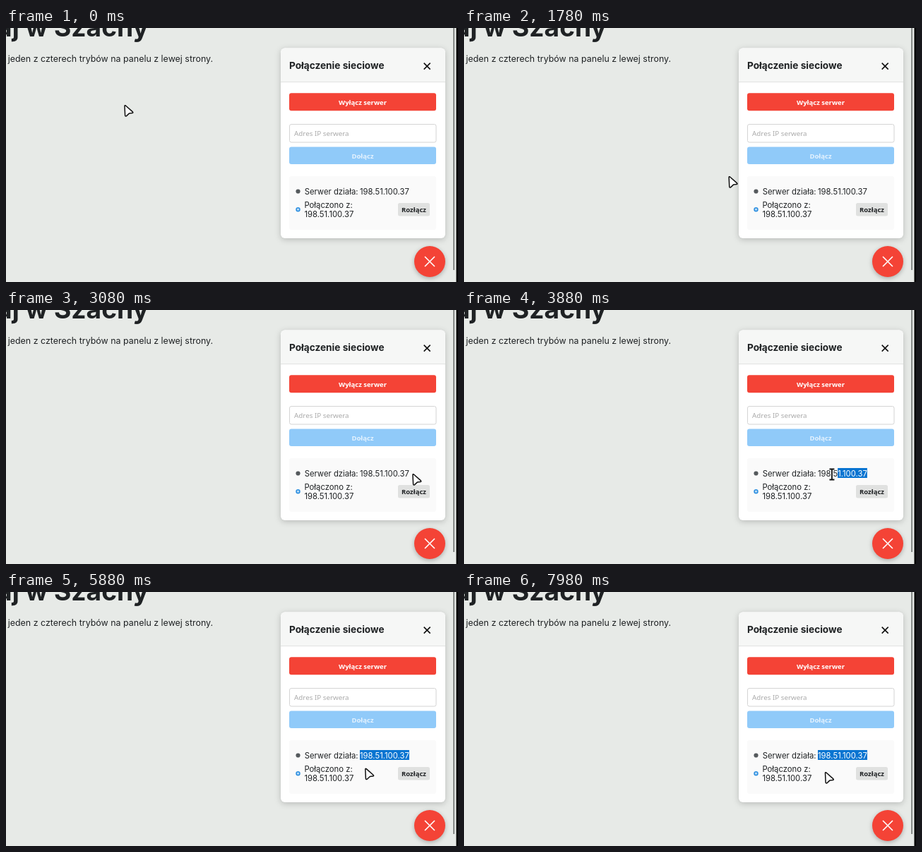
These frames come from a looping animation (640 by 360 pixels, 8000 ms). An HTML page:

```html
<!DOCTYPE html>
<html lang="pl">
<head>
<meta charset="utf-8">
<title>Połączenie sieciowe</title>
<style>
  html, body { margin: 0; width: 100%; height: 100%; overflow: hidden; background: #e7eae7; }
  svg { display: block; width: 640px; height: 360px; }
  text { font-family: Inter, sans-serif; fill: #1f2224; }
  .heading { font-size: 37.2px; font-weight: 700; text-anchor: end; }
  .lead { font-size: 12.45px; }
  .title { font-size: 13.65px; font-weight: 700; }
  .status { font-size: 11.3px; }
  .control { font: 600 9.5px "Noto Sans", sans-serif; text-anchor: middle; }
  .hint { font: 9.8px "Noto Sans", sans-serif; fill: #aaa; }
  .light { fill: #fff; }
  .panel { filter: drop-shadow(0 2px 4px #0003); }
  .fab { filter: drop-shadow(0 2px 3px #0004); }
</style>
</head>
<body>
<svg viewBox="0 0 640 360">
  <defs>
    <clipPath id="selectionClip"><rect id="selection" y="224" width="0" height="14"/></clipPath>
  </defs>
  <rect width="640" height="360" fill="#e7eae7"/>
  <text class="heading" x="202" y="11.7">Zagraj w Szachy</text>
  <text class="lead" x="2.7" y="48.1">jeden z czterech trybów na panelu z lewej strony.</text>
  <rect x="633.3" width="1.7" height="343" fill="#747876"/>
  <rect x="637.5" width="2.5" height="360" fill="#050505"/>

  <g class="panel">
    <rect x="389" y="28.5" width="233" height="269.5" rx="6" fill="#fff"/>
    <path d="M389 76.5V34.5a6 6 0 0 1 6-6H616a6 6 0 0 1 6 6V76.5Z" fill="#f6f7f6"/>
    <path d="M389 76.5H622" stroke="#e1e3e1"/>
  </g>
  <text class="title" x="401" y="57.7">Połączenie sieciowe</text>
  <path d="M591.7 49.6l9 9m0-9l-9 9" stroke="#111" stroke-width="1.6"/>

  <rect x="401" y="92.3" width="208" height="25" rx="3" fill="#f44336"/>
  <text class="control light" x="505" y="108.8">Wyłącz serwer</text>
  <rect x="401.5" y="136.5" width="207.5" height="25.5" rx="2.5" fill="#fff" stroke="#d4d4d4"/>
  <text class="hint" x="408" y="153">Adres IP serwera</text>
  <rect x="401" y="168.5" width="208" height="24.5" rx="3" fill="#90caf9"/>
  <text class="control" x="505" y="184.7" style="fill:#e4f2fe">Dołącz</text>

  <rect x="401" y="210" width="208" height="76" rx="3" fill="#fafafa"/>
  <circle cx="413.5" cy="231.5" r="3.1" fill="#555a5d"/>
  <text class="status" x="422.7" y="235.6">Serwer działa:</text>
  <text class="status" id="address" x="501" y="235.6">198.51.100.37</text>
  <g clip-path="url(#selectionClip)">
    <rect x="490" y="224" width="100" height="14" fill="#0874d1"/>
    <text class="status light" x="501" y="235.6">198.51.100.37</text>
  </g>
  <circle cx="413.5" cy="257.2" r="2.4" fill="#b9dcf8" stroke="#2e8fe0" stroke-width="1.6"/>
  <text class="status" x="422.4" y="255.2">Połączono z:</text>
  <text class="status" x="422.4" y="268.2">198.51.100.37</text>
  <rect x="555" y="248" width="45" height="18.5" rx="2.5" fill="#e0e1e0"/>
  <text class="control" x="577.5" y="260.8">Rozłącz</text>

  <circle class="fab" cx="600" cy="331" r="22" fill="#f44336"/>
  <path d="M593 324l14 14m0-14l-14 14" stroke="#fff" stroke-width="1.6"/>

  <path id="arrow" d="M1 1.6Q1 .2 2.4 1L12.4 9.9Q13.4 11.2 11.8 11.4L7.6 11.9L3.6 15.6Q1.8 16.8 1.6 14.6Z"
        fill="#fff" stroke="#111" stroke-width="1.5" stroke-linejoin="round"/>
  <g id="beam" fill="none">
    <path d="M-3.5-7.5H3.5M0-7.5V7.5M-3.5 7.5H3.5" stroke="#fff" stroke-width="3.6" stroke-linecap="square"/>
    <path d="M-3.5-7.5H3.5M0-7.5V7.5M-3.5 7.5H3.5" stroke="#111" stroke-width="1.8"/>
  </g>
</svg>
<script>
  const LOOP = 8000;
  const BEAM_ON = 3240, BEAM_OFF = 5500;
  const DRAG_START = 3350, DRAG_END = 4350, DRAG_LAG = 80;
  // time, x, y of the pointer
  const path = [
    [0, 167, 109], [100, 167, 109], [1780, 374, 210], [3080, 575, 232],
    [3350, 573, 233], [3880, 521, 233], [4250, 500, 234],
    [5250, 500, 234], [6100, 510.5, 255], [LOOP, 510.5, 255]
  ];
  const byId = id => document.getElementById(id);
  const [address, selection, arrow, beam] = ['address', 'selection', 'arrow', 'beam'].map(byId);

  const stops = Array.from(address.textContent, (_, i) => address.getStartPositionOfChar(i).x);
  const textEnd = address.getEndPositionOfChar(stops.length - 1).x;
  stops.push(textEnd);

  function pointerAt(time) {
    const next = path.findIndex(step => step[0] > time);
    const [t0, x0, y0] = path[next - 1], [t1, x1, y1] = path[next];
    const p = (time - t0) / (t1 - t0);
    return [x0 + (x1 - x0) * p, y0 + (y1 - y0) * p];
  }

  function selectionStart(time) {
    if (time < DRAG_START) return textEnd;
    const [x] = pointerAt(Math.min(time, DRAG_END) - DRAG_LAG);
    return stops.reduce((best, stop) => Math.abs(stop - x) < Math.abs(best - x) ? stop : best);
  }

  function draw() {
    const time = performance.now() % LOOP;
    const isBeam = time >= BEAM_ON && time < BEAM_OFF;
    const place = `translate(${pointerAt(time)})`;
    arrow.setAttribute('transform', place);
    beam.setAttribute('transform', place);
    arrow.style.display = isBeam ? 'none' : '';
    beam.style.display = isBeam ? '' : 'none';

    const start = selectionStart(time);
    selection.setAttribute('x', start);
    selection.setAttribute('width', textEnd - start);
    requestAnimationFrame(draw);
  }
  draw();
</script>
</body>
</html>
```
